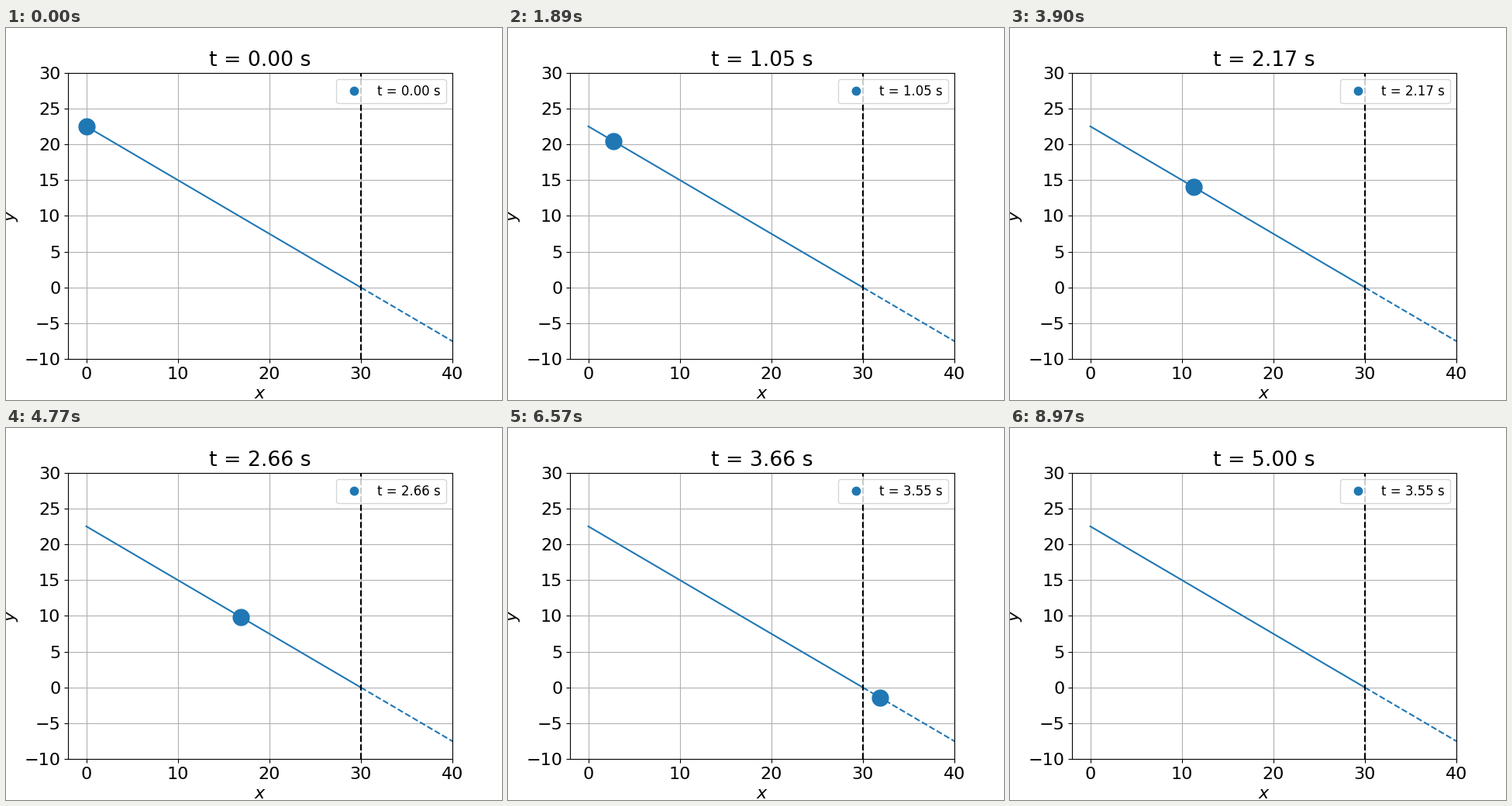
A matplotlib script that plays this animation: 640x480 px, repeating every 9 s.

```python
import numpy as np
import matplotlib.pyplot as plt
from matplotlib.animation import FuncAnimation

FRAMES = 300
INTERVAL = 30  # ms
T_MAX = 5.0

G = 9.8
X_END = 30.0       # foot of the slope
HEIGHT = 22.5
V0 = 0.1           # initial horizontal speed
SLOPE = HEIGHT / X_END
ACC = G * SLOPE / (1 + SLOPE**2)  # horizontal part of g * sin(angle)

times = np.linspace(0, T_MAX, FRAMES)
xs = V0 * times + 0.5 * ACC * times**2
t_foot = times[xs <= X_END][-1]


def height(x):
    return HEIGHT - SLOPE * x


def label(t):
    return f"t = {t:.2f} s"


plt.rcParams.update({"font.family": "DejaVu Sans", "font.size": 16})
fig, ax = plt.subplots(figsize=(6.4, 4.8), dpi=100)

for span, style in (((0, X_END), "-"), ((X_END, 50), "--")):
    x = np.array(span)
    ax.plot(x, height(x), style, color="C0")
ax.axvline(X_END, color="k", ls="--")
ball, = ax.plot([0], [HEIGHT], "o", color="C0", ms=15, label=label(0))

ax.set_xlim(-2, 40)
ax.set_ylim(-10, 30)
ax.set_xticks(range(0, 41, 10))
ax.set_yticks(range(-10, 31, 5))
ax.set_xlabel("$x$")
ax.set_ylabel("$y$")
ax.grid()
title = ax.set_title(label(0))
legend = ax.legend(loc="upper right", fontsize=12, markerscale=0.5)
clock = legend.get_texts()[0]


def update(i):
    t, x = times[i], xs[i]
    ball.set_data([x], [height(x)])
    title.set_text(label(t))
    clock.set_text(label(min(t, t_foot)))
    return ball, title, clock


anim = FuncAnimation(fig, update, frames=FRAMES, interval=INTERVAL,
                     repeat=True, repeat_delay=0, blit=False)
plt.show()
```
